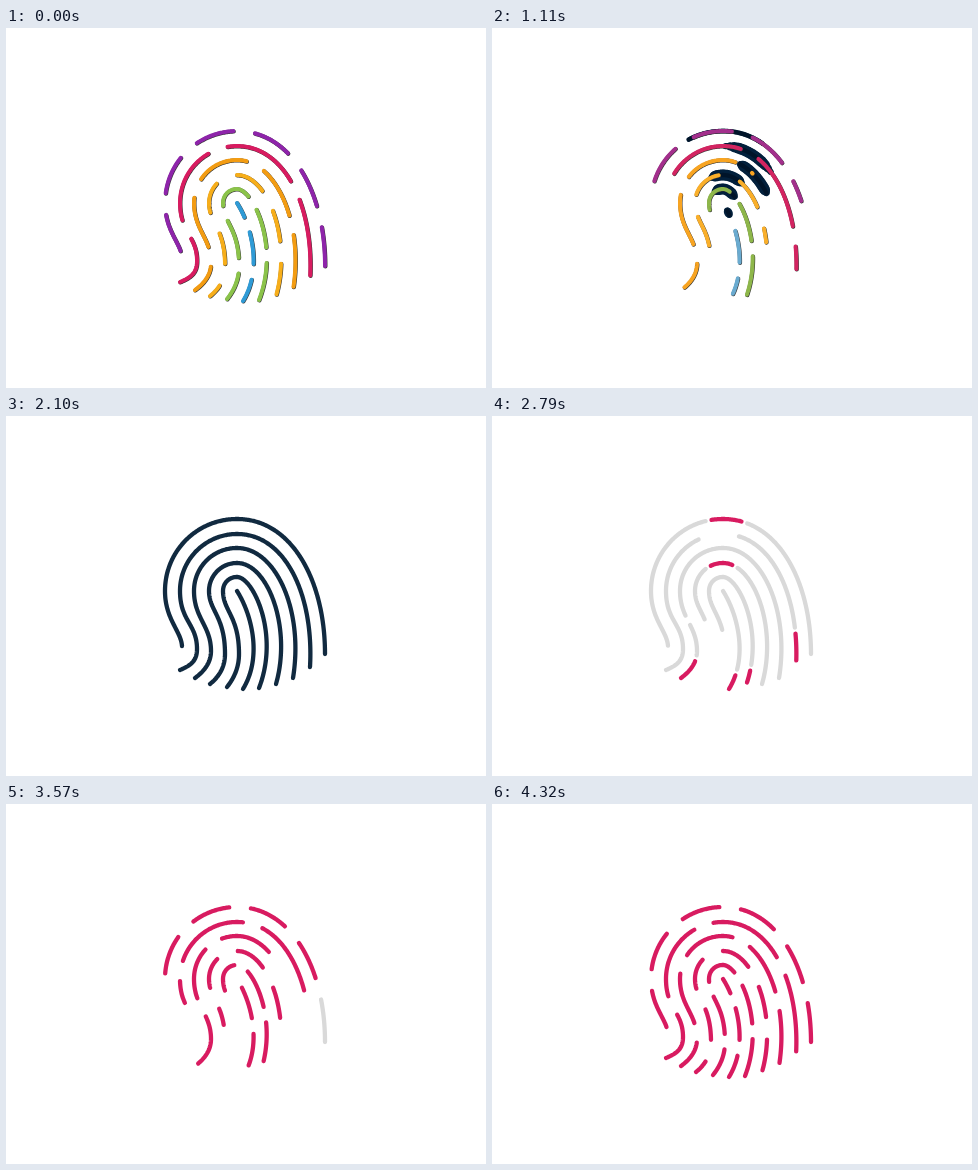
Write an HTML page with a canvas that moves like this. It is 480 px wide and 360 px high and loops after 4500 ms.

```html
<!DOCTYPE html>
<html lang="en">
<head>
<meta charset="utf-8">
<title>Fingerprint</title>
<style>
html, body { margin: 0; width: 100%; height: 100%; overflow: hidden; background: #fff; }
canvas { display: block; width: 480px; height: 360px; }
</style>
</head>
<body>
<canvas id="stage" width="480" height="360"></canvas>
<script>
const ctx = document.getElementById('stage').getContext('2d');
const LOOP = 4500, WIDTH = 4.3, PINK = '#d81b60', GREY = '#d9d9d9', NAVY = '#10293f';

// Distances are px along a ridge. from/to: starts of two dashes, `steps` periods apart.
// spin, unwind: dash drift; last, ink, seed, grown, cut: spans reached at key times.
const ridges = [
  { d: 'M176 230C175 215 159 203 159 175C159 135 191 103 231 103C286 103 319 165 319 238',
    color: '#8e24aa', late: '#b0357a', from: [160, 167], to: [315, 197], steps: 4, dash: 43,
    spin: [-15, -79], unwind: -65, taper: 0,
    last: [139, 214], ink: [0, 349], seed: [160, 190], grown: [63, 289], cut: [0, 0] },
  { d: 'M174 254C186 249 191 244 191 233C191 208 174 205 174 175C174 143 200 118 231 118C280 118 308 180 304 251',
    color: '#d81b60', late: '#d02a62', from: [177, 194], to: [293, 170], steps: 2, dash: 81,
    spin: [8, 85], unwind: 36, taper: 2.2,
    last: [250, 328], ink: [89, 330], seed: [180, 176], grown: [66, 285], cut: [155, 196] },
  { d: 'M189 262C200 254 205 245 205 235C205 210 188 202 188 175C188 151 207 132 231 132C270 132 298 195 287 262',
    color: '#f39c12', late: '#fba92a', from: [203, 221], to: [288, 205], steps: 3, dash: 56,
    spin: [-27, -108], unwind: -45, taper: .8,
    last: [9, 66], ink: [112, 290], seed: [0, 22], grown: [0, 204], cut: [60, 70] },
  { d: 'M204 268C214 260 219 250 219 238C219 200 203 195 203 175C203 160 215 147 231 147C262 147 286 212 270 268',
    color: '#f7ae1a', late: '#fbb034', from: [219, 238], to: [277, 234], steps: 4, dash: 35,
    spin: [-12, -57], unwind: -53, taper: .8,
    last: [113, 173], ink: [76, 222], seed: [132, 154], grown: [52, 232], cut: [0, 70] },
  { d: 'M221 271C229 261 233 250 233 238C233 200 217 195 217 175C217 167 223 161 231 161C247 161 274 218 253 272',
    color: '#8bc34a', late: '#8fb04a', from: [233, 232], to: [262, 233], steps: 3, dash: 43,
    spin: [10, 83], unwind: 38, taper: .8,
    last: [195, 247], ink: [75, 178], seed: [228, 240], grown: [90, 247], cut: [0, 60] },
  { d: 'M231 175C245 197 257 240 237 273',
    color: '#2f9bd6', late: '#8cb4cc', from: [243, 202], to: [245, 250], steps: 1, dash: 36,
    spin: [-25, -72], unwind: -22, taper: .8,
    last: [60, 86], ink: [0, 22], seed: [88, 104], grown: [0, 98], cut: [104, 104] }
];

for (const r of ridges) {
  const path = document.createElementNS('http://www.w3.org/2000/svg', 'path');
  path.setAttribute('d', r.d);
  r.len = path.getTotalLength();
  r.at = s => path.getPointAtLength(s);
  r.pts = Array.from({ length: Math.ceil(r.len) + 1 }, (_, i) => r.at(i));
  const near = ([x, y]) => {
    const gaps = r.pts.map(p => Math.hypot(p.x - x, p.y - y));
    return gaps.indexOf(Math.min(...gaps));
  };
  r.start = near(r.from);
  r.period = (near(r.to) - r.start) / r.steps;
}

const middle = ([a, b]) => [(a + b) / 2, (a + b) / 2];

// Linear keyframes: [[time, ...values], ...]
function keyed(t, keys) {
  if (t <= keys[0][0]) return keys[0].slice(1);
  const i = keys.findIndex(k => k[0] > t);
  if (i < 0) return keys[keys.length - 1].slice(1);
  const a = keys[i - 1], b = keys[i], k = (t - a[0]) / (b[0] - a[0]);
  return a.slice(1).map((v, j) => v + (b[j + 1] - v) * k);
}

function mix(a, b, k) {
  const part = (hex, i) => parseInt(hex.slice(i, i + 2), 16);
  return `rgb(${[1, 3, 5].map(i => Math.round(part(a, i) + (part(b, i) - part(a, i)) * k))})`;
}

function stroke(r, [a, b], width, color) {
  a = Math.max(0, a);
  b = Math.min(r.len, b);
  if (b <= a) return;
  const p = r.at(a), q = r.at(b);
  ctx.beginPath();
  ctx.moveTo(p.x, p.y);
  for (let i = Math.ceil(a); i < b; i++) ctx.lineTo(r.pts[i].x, r.pts[i].y);
  ctx.lineTo(q.x, q.y);
  ctx.lineWidth = width;
  ctx.strokeStyle = color;
  ctx.stroke();
}

function dashes(r, shift, [lo, hi]) {
  const out = [];
  for (let i = -6; i < 8; i++) {
    const s = r.start + i * r.period + shift;
    const a = Math.max(lo, s + 2), b = Math.min(hi, s + r.dash - 2);
    if (b > a) out.push([a, b]);
  }
  return out;
}

const without = (spans, [a, b]) => b <= a ? spans
  : spans.flatMap(([s, e]) => [[s, Math.min(e, a)], [Math.max(s, b), e]]).filter(([s, e]) => e > s);

function drawInk(t) {
  const [fat] = keyed(t, [[1000, 5], [1350, 24], [1500, 24], [1950, WIDTH]]);
  const [thin] = keyed(t, [[1500, 0], [1950, 1]]);
  const [pale] = keyed(t, [[2100, 0], [2370, 1]]);
  const spans = ridges.map(r =>
    keyed(t, [[1000, ...middle(r.ink)], [1500, ...r.ink], [1750, 0, r.len]]));
  const body = mix('#02203c', NAVY, thin);
  ridges.forEach((r, i) => {
    const top = r.taper ? fat : WIDTH + (fat - WIDTH) * .05;
    for (let w = WIDTH; w < top; w += 2) {
      const inset = (w - WIDTH) * r.taper;
      stroke(r, [spans[i][0] + inset, spans[i][1] - inset], Math.min(w + 2, top), body);
    }
  });
  const line = pale ? mix(NAVY, GREY, pale) : mix('#001429', NAVY, thin);
  ridges.forEach((r, i) => stroke(r, spans[i], WIDTH, line));

  // Droplets gathering at the lower tips
  const [drop] = keyed(t, [[1300, 0], [1500, 1], [1700, 1], [1900, 0]]);
  if (drop) [[1, 3, 4], [2, 6, 7], [4, 13, 6]].forEach(([i, size, w]) => {
    const r = ridges[i];
    stroke(r, [r.len - size * drop, r.len], w * drop, body);
  });
}

function drawRainbow(t) {
  const [age] = keyed(t, [[450, 0], [1500, 1]]);
  const trim = age ** 1.56;
  for (const r of ridges) {
    const [shift] = keyed(t, [[450, 0], [690, r.spin[0]], [1500, r.spin[1]], [1720, r.spin[1] * 1.2]]);
    const view = t < 1500
      ? [r.last[0] * trim, r.len + (r.last[1] - r.len) * trim]
      : keyed(t, [[1500, ...r.last], [1720, ...middle(r.last)]]);
    for (const span of dashes(r, shift, view)) {
      ctx.save();
      ctx.translate(.4, .4);
      stroke(r, span, 4.2, '#333333');
      ctx.restore();
      stroke(r, span, 4, mix(r.color, r.late, age));
    }
  }
}

function drawPink(t) {
  const left = Math.max(0, (4320 - t) / 750);
  ridges.forEach((r, i) => {
    const view = keyed(t, [[2520, ...middle(r.seed)], [2790, ...r.seed], [3570, ...r.grown], [4200, 0, r.len]]);
    const gone = [0, i ? r.len : r.len - 43];
    const cut = keyed(t, [[2520, ...middle(r.cut)], [2790, ...r.cut], [3570, ...gone], [3750, 0, r.len]]);
    const [pad] = keyed(t, [[2520, 0], [2790, 6], [3570, 17]]);
    const spark = i === 1 && t < 3200
      ? keyed(t, [[2520, 330, 330], [2790, 315, 342], [3200, r.len, r.len]]) : [0, 0];

    let grey = without([[0, r.len]], cut);
    grey = without(grey, [view[0] - pad, view[1] + pad]);
    if (spark[1] > spark[0]) grey = without(grey, [spark[0] - pad, r.len]);
    grey.forEach(span => stroke(r, span, WIDTH, GREY));

    // Young spans stay whole; older ones break into dashes.
    const pink = t < 2850 ? [view] : dashes(r, r.unwind * left ** 1.2, view);
    pink.concat([spark]).forEach(span => stroke(r, span, WIDTH, PINK));
  });
}

function frame(now) {
  const t = now % LOOP;
  ctx.fillStyle = '#fff';
  ctx.fillRect(0, 0, 480, 360);
  ctx.lineCap = ctx.lineJoin = 'round';
  if (t >= 1000 && t < 2520) drawInk(t);
  if (t < 1720) drawRainbow(t);
  if (t >= 2520) drawPink(t);
  requestAnimationFrame(frame);
}
requestAnimationFrame(frame);
</script>
</body>
</html>
```
